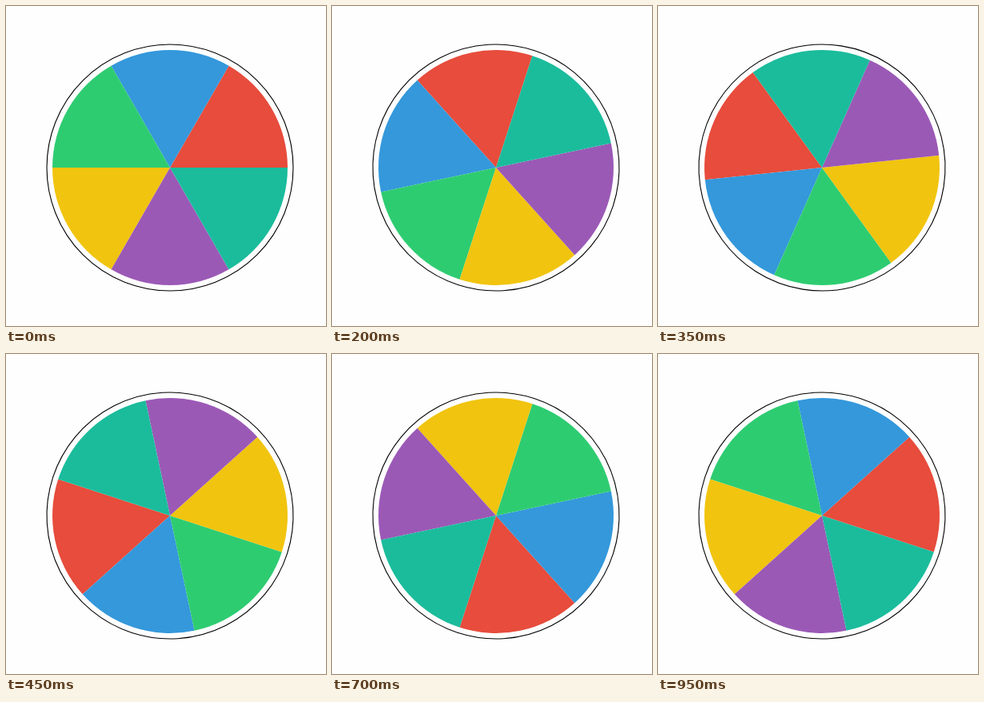
Write an HTML page with a canvas that moves like this. It is 400 px wide and 400 px high and loops after 1000 ms.

```html
<!DOCTYPE html>
<html lang="en">
<head>
<meta charset="utf-8">
<title>Spinning wheel</title>
<style>
  html, body { margin: 0; width: 100%; height: 100%; overflow: hidden; background: #fefefe; }
  canvas { display: block; width: 400px; height: 400px; }
</style>
</head>
<body>
<canvas id="stage" width="400" height="400"></canvas>
<script>
const ctx = document.getElementById('stage').getContext('2d');
const colors = ['#e74c3c', '#3498db', '#2ecc71', '#f1c40f', '#9b59b6', '#1abc9c'];
const TAU = Math.PI * 2;
const LOOP = 1000;
const STEPS = 20;
const CENTER = { x: 205, y: 202 };
const WHEEL = 147;
const RIM = 154;

function drawWheel(angle) {
  ctx.fillStyle = '#fefefe';
  ctx.fillRect(0, 0, 400, 400);
  ctx.save();
  ctx.translate(CENTER.x, CENTER.y);
  ctx.rotate(-angle);

  const slice = TAU / colors.length;
  colors.forEach((color, i) => {
    ctx.fillStyle = color;
    ctx.beginPath();
    ctx.moveTo(0, 0);
    ctx.arc(0, 0, WHEEL, -i * slice, -(i + 1) * slice, true);
    ctx.closePath();
    ctx.fill();
  });

  ctx.strokeStyle = '#000';
  ctx.lineWidth = 1.1;
  ctx.lineCap = 'square';
  ctx.beginPath();
  ctx.arc(0, 0, RIM, 0, TAU);
  ctx.stroke();
  ctx.restore();
}

// One counterclockwise turn per loop, in equal hard steps
let shown = -1;
function tick(now) {
  const step = Math.floor((Math.max(0, now - start) % LOOP) / LOOP * STEPS + 1e-6);
  if (step !== shown) {
    shown = step;
    drawWheel(step / STEPS * TAU);
  }
  requestAnimationFrame(tick);
}

const start = performance.now();
tick(start);
</script>
</body>
</html>
```
